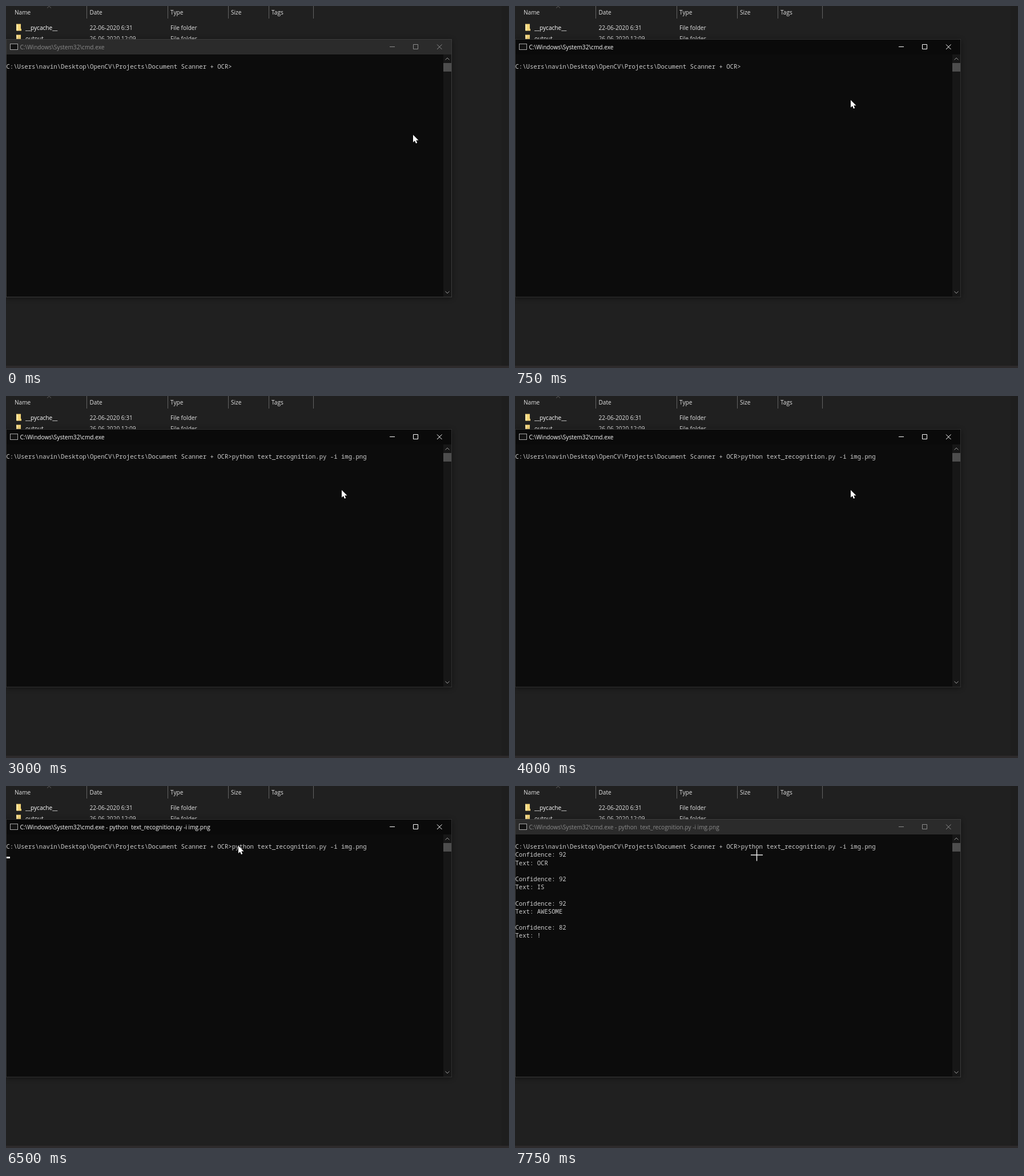
Write an HTML page that moves like this. It is 881 by 635 pixels and loops after 8 s.

```html
<!DOCTYPE html>
<html lang="en">
<head>
<meta charset="utf-8">
<title>Console session</title>
<style>
  html, body { margin: 0; width: 881px; height: 635px; overflow: hidden; background: #202020; }
  svg { display: block; }
  text { white-space: pre; }
  .ui { font: 10.1px "Open Sans", "Noto Sans", sans-serif; fill: #e2e2e2; }
  .mono { font: 10.63px "Noto Sans Mono", "DejaVu Sans Mono", monospace; fill: #ccc; }
  .line { fill: none; stroke: #636363; }
  .shadow { filter: drop-shadow(0 2px 5px #0007); }
</style>
</head>
<body>
<svg width="881" height="635" viewBox="0 0 881 635">
  <rect width="881" height="635" fill="#202020"/>
  <rect x="868" width="13" height="631" fill="#1e1e1e"/>
  <rect y="631" width="881" height="4" fill="#2d2a2b"/>

  <!-- File list -->
  <path class="line" d="M141.5 0V22M283.5 0V22M389.5 0V22M460.5 0V22M538.5 0V22"/>
  <path class="line" d="M72 3.5L75.500 .5L79 3.500" stroke="#999"/>
  <g id="list" class="ui"></g>

  <!-- Console window -->
  <rect class="shadow" y="58" width="781" height="452" fill="#0c0c0c"/>
  <rect id="bar" y="58" width="781" height="27"/>
  <rect x="766" y="85" width="14" height="425" fill="#171717"/>
  <rect x="766" y="100" width="14" height="15" fill="#4d4d4d"/>
  <path class="line" d="M769.500 94.500L773 91L776.500 94.500M769.500 500.500L773 504L776.500 500.500" style="stroke:#999"/>
  <rect id="frame" class="line" x=".5" y="58.500" width="780" height="452"/>
  <rect x="7.500" y="66.500" width="13" height="10" fill="#111" stroke="#a8a8a8"/>
  <text id="title" class="ui" x="24.500" y="75.500"></text>
  <path id="buttons" class="line" d="M672 71.500H681M713.500 67.500H721.500V75.500H713.500ZM755 67.500L763.500 76M763.500 67.500L755 76"/>
  <g id="lines" class="mono"></g>
  <rect id="caret" width="6" height="3" fill="#f2f2f2"/>

  <!-- Pointers -->
  <path id="arrow" d="M0 0V13L3 10.300L5 15L7.200 14L5.200 9.500H9.500Z" fill="#fff"/>
  <path id="cross" d="M413 121H434M423.500 111V131.500" stroke="#e8e8e8" stroke-width="1.500"/>
</svg>
<script>
const $ = id => document.getElementById(id);
const LOOP = 8000, CELL = 6.38, PITCH = 14.18;
const PROMPT = "C:\\Users\\navin\\Desktop\\OpenCV\\Projects\\Document Scanner + OCR>";
const COMMAND = "python text_recognition.py -i img.png";
const SHELL = "C:\\Windows\\System32\\cmd.exe";
const RESULTS = [[92, "OCR"], [92, "IS"], [92, "AWESOME"], [82, "!"]];

// Each entry is [start, ...values] and holds until the next one.
const POINTER = [
  [0, 713, 226], [250, 598, 173], [500, 588, 165], [5750, 598, 188], [6000, 488, 304],
  [6250, 399, 111], [6500, 407, 105], [7000, 410, 105], [7250, 409, 107]
];
const TYPED = [[0, 0], [1250, 3], [2000, COMMAND.length]];
const CARET = [
  [0, 0], [1250, 1], [1500, 0], [2500, 1], [3000, 0], [3500, 1], [4000, 0],
  [5000, 1], [5750, 0], [6250, 1], [6750, 0], [7250, 1], [7750, 0]
];
const at = (track, t) => track.findLast(step => step[0] <= t).slice(1);

function addText(parent, x, y, content = "") {
  const el = document.createElementNS("http://www.w3.org/2000/svg", "text");
  el.setAttribute("x", x);
  el.setAttribute("y", y);
  el.textContent = content;
  return parent.appendChild(el);
}

function addRow(y, name, date) {
  $("list").insertAdjacentHTML("beforeend",
    `<path d="M18 ${y - 10}h8v8l1 1v3h-9z" fill="#f5d477"/>
     <path d="M18 ${y - 10}l3 2v10l-3-1z" fill="#ffe8a3"/>`);
  addText($("list"), 34, y, name).style.fill = "#fff";
  addText($("list"), 146.5, y, date);
  addText($("list"), 288, y, "File folder");
}

const columns = { Name: 15, Date: 146.5, Type: 288, Size: 394, Tags: 465 };
for (const name in columns) addText($("list"), columns[name], 15, name);
addRow(41.5, "__pycache__", "22-06-2020 6:31");
addRow(60.5, "output", "26-06-2020 12:09");

const baseline = row => 110.3 + row * PITCH;
const input = addText($("lines"), 0.5, baseline(0));
const output = RESULTS.flatMap(([score, word], i) => [
  addText($("lines"), 0.5, baseline(3 * i + 1), `Confidence: ${score}`),
  addText($("lines"), 0.5, baseline(3 * i + 2), `Text: ${word}`)
]);

const show = (el, on) => el.style.display = on ? "" : "none";

function draw(now) {
  const t = now % LOOP;
  const done = t >= 7750, running = t >= 4500;
  const active = t >= 750 && !done;
  const [typed] = at(TYPED, t);
  const [x, y] = at(POINTER, t);

  $("bar").style.fill = active ? "#0a0a0a" : "#2b2b2b";
  $("frame").style.stroke = active ? "#303030" : "#3c3c3c";
  $("title").style.fill = active ? "#fff" : "#8c8c8c";
  $("buttons").style.stroke = active ? "#fff" : "#8c8c8c";
  $("title").textContent = SHELL + (running ? " - " + COMMAND.replace(" ", "  ") : "");

  input.textContent = PROMPT + COMMAND.slice(0, typed);
  output.forEach(line => show(line, done));
  show($("caret"), at(CARET, t)[0]);
  $("caret").setAttribute("x", running ? 1 : Math.round((PROMPT.length + typed) * CELL));
  $("caret").setAttribute("y", running ? 124 : 110);

  show($("arrow"), !done);
  show($("cross"), done);
  $("arrow").setAttribute("transform", `translate(${x} ${y})`);
  requestAnimationFrame(frame);
}

const start = performance.now();
const frame = () => draw(performance.now() - start);
frame();
</script>
</body>
</html>
```
